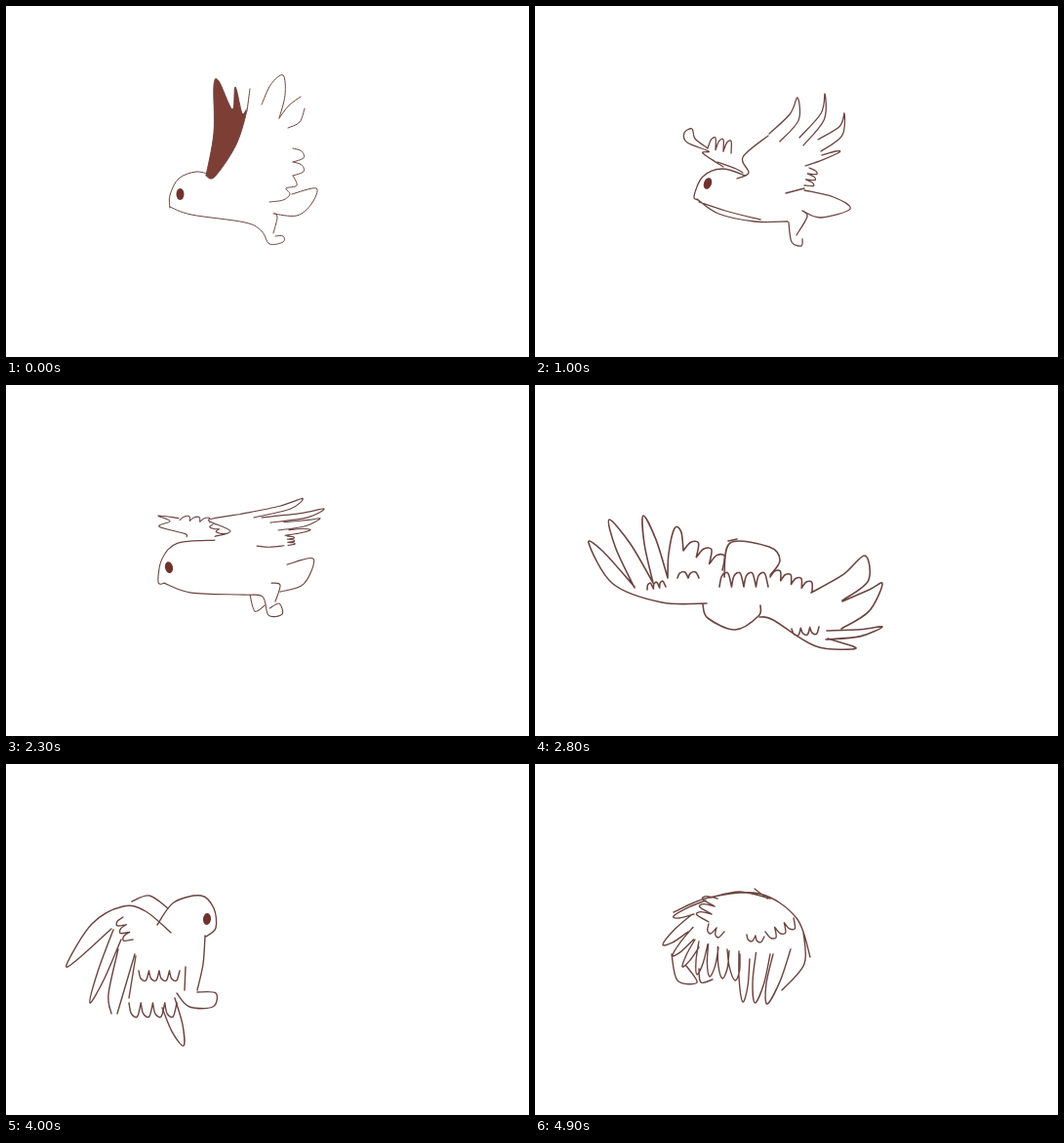
Write an HTML page with a canvas that moves like this. It is 536 by 360 pixels and loops after 5 s.

```html
<!DOCTYPE html>
<html>
<head>
<meta charset="utf-8">
<style>
html, body { margin: 0; width: 100%; height: 100%; overflow: hidden; background: #fff; }
canvas { display: block; }
</style>
</head>
<body>
<canvas id="stage" width="536" height="360"></canvas>
<script>
const ctx = document.getElementById('stage').getContext('2d');
const mix = (a, b, t) => a + (b - a) * t;
let lift = 1, move, lines;

// Smooth stroke through the given x, y pairs.
function line(...n) {
  const pts = [];
  for (let i = 0; i < n.length; i += 2) pts.push(move(n[i], n[i + 1]));
  lines.push(pts);
}

// Feather from base a over tip t to base b; bend pushes it to the left of its direction.
function plume(ax, ay, tx, ty, bx, by, bend = 0) {
  const nx = (ty - (ay + by) / 2) * bend, ny = ((ax + bx) / 2 - tx) * bend;
  const wx = (ax - bx) * .2, wy = (ay - by) * .2;
  line(ax, ay, mix(ax, tx, .6) + wx + nx, mix(ay, ty, .6) + wy + ny, tx, ty,
    mix(bx, tx, .6) - wx + nx, mix(by, ty, .6) - wy + ny, bx, by);
}

// Evenly changing feathers between two given ones.
function fan(count, first, last) {
  for (let i = 0; i < count; i++) plume(...first.map((v, j) => mix(v, last[j], i / (count - 1))));
}

// Row of small round feathers, height h to the left of the direction.
function scallops(x0, y0, x1, y1, count, h) {
  const dx = (x1 - x0) / count, dy = (y1 - y0) / count, len = Math.hypot(dx, dy);
  const nx = dy / len * h, ny = -dx / len * h;
  for (let i = 0; i < count; i++) {
    const x = x0 + dx * i, y = y0 + dy * i;
    line(x, y, x + dx * .2 + nx * .8, y + dy * .2 + ny * .8,
      x + dx * .7 + nx, y + dy * .7 + ny, x + dx, y + dy);
  }
}

function trace(p) {
  ctx.moveTo(...p[0]);
  for (let i = 0; i < p.length - 1; i++) {
    const a = p[i - 1] || p[i], b = p[i], c = p[i + 1], d = p[i + 2] || c;
    ctx.bezierCurveTo(b[0] + (c[0] - a[0]) / 6, b[1] + (c[1] - a[1]) / 6,
      c[0] - (d[0] - b[0]) / 6, c[1] - (d[1] - b[1]) / 6, ...c);
  }
}

function group(mover, shape, fill) {
  move = mover;
  lines = [];
  shape();
  if (fill) {
    ctx.beginPath();
    trace(lines.flat());
    ctx.fillStyle = fill;
    ctx.fill();
  }
  ctx.beginPath();
  lines.forEach(trace);
  ctx.stroke();
}

const still = shape => group((x, y) => [x, y], shape);
const flap = (cy, shape, fill) => group((x, y) => [x, cy + (y - cy) * lift], shape, fill);
function swing(side, cx, cy, shape) {
  const a = side * (1 - lift) * .6, c = Math.cos(a), s = Math.sin(a);
  group((x, y) => [cx + (x - cx) * c - (y - cy) * s, cy + (x - cx) * s + (y - cy) * c], shape);
}
function eye(x, y, tilt) {
  ctx.beginPath();
  ctx.ellipse(x, y, 4, 6, tilt, 0, 7);
  ctx.fillStyle = '#6e332e';
  ctx.fill();
}

function wingsHigh(step) {
  flap(174, () => line(205, 174, 213, 130, 213, 82, 218, 77, 232, 106, 235, 83, 242, 110, 247, 106, 236, 142, 214, 175, 205, 174),
    step ? '#fff' : '#7d3e36');
  still(() => {
    line(168, 207, 168, 194, 177, 177, 195, 170, 212, 174);
    line(168, 206, 190, 214, 245, 222, 262, 231, 270, 244, 284, 242, 284, 236, 276, 236);
    line(275, 212, 278, 217, 274, 233);
    line(274, 213, 298, 215, 313, 203, 318, 187, 293, 193);
  });
  flap(174, () => {
    line(250, 85, 247, 108);
    plume(262, 101, 284, 71, 280, 115);
    line(280, 115, 290, 102, 302, 93);
    line(289, 125, 301, 119, 306, 105);
    scallops(294, 146, 294, 174, 2, 11);
    line(294, 174, 298, 184, 287, 187, 291, 193, 284, 199, 270, 201);
  }, '#fff');
  eye(178.5, 193, 0);
}

function wingsSpread() {
  flap(168, () => {
    line(193, 165, 172, 151, 178, 149, 156, 140, 153, 130, 161, 126, 164, 136, 177, 146);
    scallops(177, 146, 201, 151, 3, 12);
    line(187, 160, 206, 167, 213, 171);
  });
  still(() => {
    line(167, 199, 163, 195, 172, 175, 192, 167, 216, 174);
    line(166, 198, 188, 213, 225, 221, 259, 221);
    line(168, 201, 195, 210, 231, 219);
    line(276, 189, 306, 196, 323, 208, 293, 217, 274, 210);
    line(260, 222, 263, 242, 273, 246, 274, 239);
    line(274, 210, 279, 216, 268, 235);
  });
  flap(172, () => {
    line(207, 177, 219, 171, 213, 155, 239, 133);
    plume(240, 131, 269, 94, 251, 139, -.15);
    plume(271, 135, 297, 90, 275, 143, -.15);
    plume(290, 137, 317, 110, 293, 149, -.2);
    plume(294, 153, 312, 150, 277, 164);
    scallops(281, 166, 276, 184, 3, 9);
    line(276, 187, 257, 192);
  }, '#fff');
  eye(177, 182, .35);
}

function wingsSwept() {
  flap(155, () => {
    line(185, 162, 183, 153, 157, 134, 168, 119, 156, 104, 177, 111);
    scallops(178, 116, 209, 123, 3, 12);
  });
  still(() => {
    line(163, 205, 156, 204, 160, 180, 176, 164, 214, 161);
    line(162, 205, 190, 215, 244, 217, 263, 219, 269, 238, 283, 237, 280, 226, 270, 231);
    line(250, 217, 255, 234, 265, 228);
    line(272, 205, 281, 207, 276, 224);
    line(281, 214, 305, 206, 315, 180, 288, 186);
  });
  flap(155, () => {
    line(214, 161, 230, 146, 209, 120, 212, 112, 240, 100);
    plume(240, 100, 304, 57, 254, 109, -.1);
    plume(262, 109, 326, 85, 271, 123, -.1);
    plume(285, 122, 322, 112, 279, 144, -.1);
    plume(290, 143, 312, 143, 286, 158);
    scallops(288, 160, 289, 185, 3, 7);
    line(285, 186, 270, 190, 257, 187);
    scallops(225, 153, 212, 128, 2, 6);
  }, '#fff');
  eye(167, 189, -.2);
}

function gliding() {
  still(() => {
    line(194, 197, 200, 162, 240, 166, 251, 180, 241, 195);
    line(198, 160, 207, 158);
    line(172, 225, 177, 239, 205, 251, 229, 237, 231, 226);
    scallops(189, 207, 239, 207, 4, 14);
  });
  swing(-1, 176, 222, () => {
    line(176, 224, 130, 223, 80, 204, 55, 162, 70, 171, 102, 207);
    plume(102, 208, 76, 138, 121, 203);
    plume(121, 203, 111, 134, 136, 198);
    plume(136, 198, 143, 147, 152, 170);
    scallops(152, 170, 192, 190, 3, 14);
    scallops(115, 210, 134, 207, 3, 6);
    scallops(146, 198, 168, 198, 2, 6);
  });
  swing(1, 234, 232, () => {
    scallops(241, 197, 284, 212, 4, 9);
    plume(283, 213, 338, 175, 315, 221, -.15);
    plume(315, 222, 356, 204, 314, 250, -.1);
    plume(299, 252, 356, 248, 298, 261, -.05);
    line(300, 260, 329, 270, 288, 268, 244, 241, 230, 238);
    scallops(263, 250, 291, 248, 3, -7);
  });
}

function folded() {
  still(() => {
    line(161, 226, 165, 165, 174, 146, 195, 136, 216, 163, 223, 192);
    line(168, 157, 175, 146, 193, 138);
    line(196, 237, 225, 228, 247, 221, 240, 241, 205, 236);
    line(205, 262, 220, 268, 216, 254, 206, 257);
    line(234, 245, 233, 266, 252, 268, 248, 253, 239, 256);
  });
  swing(-1, 163, 215, () => {
    line(161, 212, 146, 268, 148, 300);
    plume(148, 300, 171, 343, 156, 292);
    plume(158, 300, 195, 352, 170, 292);
    plume(176, 300, 201, 329, 184, 290);
    scallops(150, 278, 168, 272, 2, -16);
    scallops(166, 275, 186, 258, 2, -15);
    line(180, 283, 192, 299, 204, 270, 175, 224);
  });
  swing(1, 228, 200, () => {
    line(223, 190, 250, 213, 265, 248, 261, 300, 252, 333, 249, 322, 258, 280);
    plume(252, 290, 236, 349, 243, 280);
    plume(240, 290, 228, 336, 232, 280);
  });
}

function turned() {
  flap(150, () => line(129, 141, 147, 135, 166, 148));
  still(() => {
    line(155, 165, 172, 142, 200, 135, 213, 148, 215, 168, 205, 177);
    line(204, 176, 202, 205, 196, 232);
    line(175, 235, 188, 249, 212, 249, 215, 235, 196, 234);
    plume(160, 250, 182, 289, 173, 240);
  });
  flap(170, () => {
    line(169, 173, 143, 151, 120, 146, 88, 164, 62, 206, 75, 199, 108, 169);
    scallops(120, 157, 130, 180, 3, -9);
    plume(110, 170, 86, 245, 118, 180);
    line(108, 256, 105, 236, 115, 190);
    line(114, 256, 132, 195);
    line(133, 197, 126, 240);
    scallops(126, 245, 175, 245, 4, -14);
    scallops(136, 212, 178, 212, 4, -10);
    line(184, 208, 183, 232);
  });
  eye(206, 159, .1);
}

function curled() {
  flap(140, () => {
    line(142, 152, 178, 137, 230, 133, 268, 158, 282, 198);
    line(180, 137, 210, 131, 241, 138);
    line(225, 128, 238, 138);
    line(275, 172, 276, 205, 253, 232);
    plume(175, 140, 142, 156, 163, 154);
    fan(3, [160, 155, 131, 185, 157, 172], [164, 180, 151, 208, 168, 188]);
    scallops(187, 138, 178, 162, 3, -14);
    scallops(178, 164, 194, 172, 2, -8);
    fan(4, [168, 182, 166, 216, 177, 185], [197, 190, 205, 222, 210, 195]);
    fan(3, [209, 192, 213, 244, 220, 200], [244, 195, 238, 246, 262, 190]);
    line(140, 195, 146, 222, 166, 224, 155, 207);
    line(168, 210, 170, 224, 182, 221);
    scallops(217, 175, 235, 177, 2, -6);
    scallops(236, 172, 265, 158, 3, -10);
  });
}

// Each drawing: first step, line width, shape.
const poses = [[0, 1, wingsHigh], [6, 1.3, wingsSpread], [14, 1.1, wingsSwept], [25, 1.6, gliding],
  [32, 1.5, folded], [37, 1.4, turned], [46, 1.4, curled]];
// Wing beat: [step, lift], eased between entries.
const beats = [[0, 1], [5, -1.2], [10, 1], [12, 1.7], [15, -1.5], [18, 1], [21, -1.2], [24, .9], [25, 1.3], [28, 1],
  [31, 0], [32, 2.2], [34, 1], [36, 1.6], [37, -.9], [40, 1], [43, -1.2], [45, -.5], [46, .8], [49, 1]];

function liftAt(step) {
  const i = Math.max(1, beats.findIndex(b => b[0] >= step));
  const [s0, k0] = beats[i - 1], [s1, k1] = beats[i];
  return mix(k0, k1, (1 - Math.cos(Math.PI * (step - s0) / (s1 - s0))) / 2);
}

function draw(step) {
  const [, width, shape] = poses.filter(p => p[0] <= step).pop();
  lift = liftAt(step);
  ctx.setTransform(1, 0, 0, 1, 0, 0);
  ctx.fillStyle = '#fff';
  ctx.fillRect(0, 0, 536, 360);
  ctx.translate(0, 3 * (lift - 1));
  ctx.lineWidth = width;
  ctx.lineCap = ctx.lineJoin = 'round';
  ctx.strokeStyle = '#6b4540';
  shape(step);
}

const start = performance.now();
function tick() {
  draw(Math.floor((performance.now() - start) % 5000 / 100));
  requestAnimationFrame(tick);
}
tick();
</script>
</body>
</html>
```
